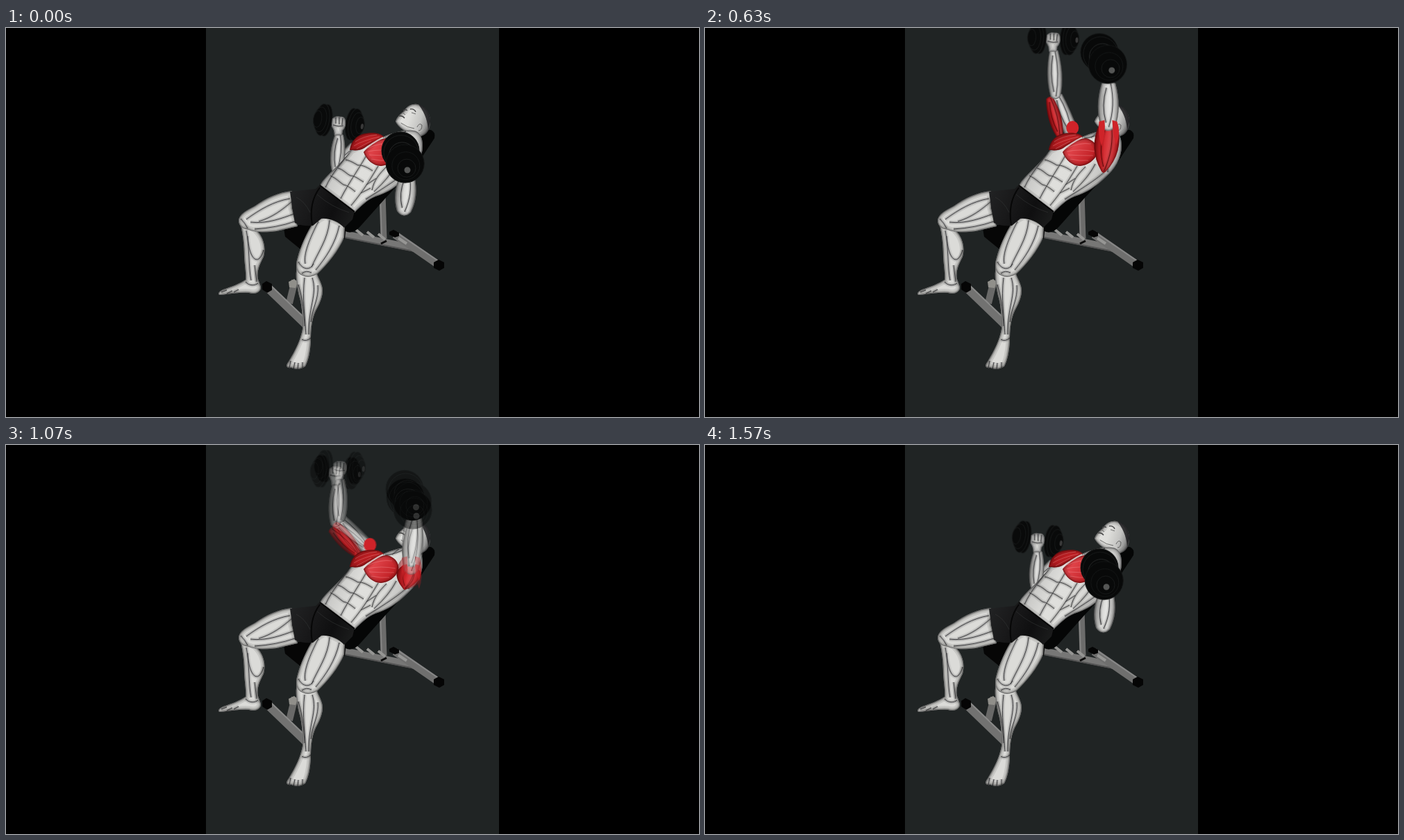
An HTML page with a canvas that plays this animation: 998x561 px, repeating every 1.61 s.

```html
<!DOCTYPE html>
<html lang="en">
<head>
<meta charset="utf-8">
<title>Incline dumbbell press</title>
<style>
html, body { margin: 0; width: 100%; height: 100%; overflow: hidden; background: #000; }
canvas { display: block; width: 100vw; height: 100vh; }
</style>
</head>
<body>
<canvas id="stage" width="998" height="561"></canvas>
<script>
const W = 998, H = 561, LOOP = 1610, STEP = 100 / 3;
const SKIN = '#dbdbd8', RED = '#cf2329';
const stage = document.getElementById('stage').getContext('2d');

function layer() {
  const c = document.createElement('canvas');
  c.width = W;
  c.height = H;
  return c.getContext('2d');
}

// ---- drawing helpers ----
function fill(g, d, color) {
  g.fillStyle = color;
  g.fill(new Path2D(d));
}

function line(g, d, color, width) {
  g.strokeStyle = color;
  g.lineWidth = width;
  g.stroke(d instanceof Path2D ? d : new Path2D(d));
}

// Filled form with darkened rim and engraved muscle lines
function form(g, d, color, lines, ink = '25,25,28') {
  const p = new Path2D(d);
  g.save();
  g.fillStyle = color;
  g.fill(p);
  g.clip(p);
  for (const [w, a] of [[11, .1], [6, .17], [2.4, .42]]) line(g, p, `rgba(${ink},${a})`, w);
  if (lines) {
    const q = new Path2D(lines);
    for (const [w, a] of [[6, .09], [3, .17], [1, .68]]) line(g, q, `rgba(${ink},${a})`, w);
  }
  g.restore();
}

function disc(g, x, y, rx, ry, color, rim) {
  g.beginPath();
  g.ellipse(x, y, rx, ry, 0, 0, 7);
  g.fillStyle = color;
  g.fill();
  if (rim) {
    g.strokeStyle = rim;
    g.lineWidth = 1;
    g.stroke();
  }
}

function ramp(g, x0, y0, x1, y1, ...colors) {
  const r = g.createLinearGradient(x0, y0, x1, y1);
  colors.forEach((c, i) => r.addColorStop(i / (colors.length - 1), c));
  return r;
}

// Tapered limb from a to b; w holds the half widths, shift moves it sideways
function limb(g, a, b, w, colors, shift = 0) {
  const dx = b[0] - a[0], dy = b[1] - a[1], len = Math.hypot(dx, dy);
  const [s, m, e] = w, bulge = 2 * m - (s + e) / 2;
  g.save();
  g.translate(a[0], a[1]);
  g.rotate(Math.atan2(dy, dx));
  g.translate(0, shift);
  const d = `M0,${-s}Q${len * .55},${-bulge} ${len},${-e}Q${len + e * 1.1},0 ${len},${e}` +
    `Q${len * .55},${bulge} 0,${s}Q${-s * .7},0 0,${-s}Z`;
  const cuts = `M0,${-s * .3}Q${len * .5},${-m * .7} ${len},${-e * .1}` +
    `M${len * .1},${s * .3}Q${len * .5},${m * .7} ${len * .9},${e * .3}`;
  form(g, d, ramp(g, 0, -m, 0, m, ...colors), cuts, colors.ink);
  g.restore();
}
const FLESH = ['#a9a9a7', '#ececea', '#d4d4d2', '#999997'];
const BLOOD = ['#b5171d', '#e0474c', '#cf2329', '#8f1015'];
BLOOD.ink = '70,0,4';

// ---- still layers ----
const back = layer(), body = layer();

function drawBack(g) {
  g.fillStyle = '#000';
  g.fillRect(0, 0, W, H);
  g.fillStyle = '#202424';
  g.fillRect(288, 0, 422, H);

  // rear frame
  line(g, 'M542,238L544,304', '#6c6c6b', 9);
  line(g, 'M539,240L541,300', '#838382', 2);
  line(g, 'M486,297L590,318', '#777776', 10);
  line(g, 'M488,302L588,322', '#555', 2);
  line(g, 'M560,298L622,341', '#6f6f6e', 11);
  line(g, 'M564,296L624,337', '#888', 2);
  line(g, 'M504,291l10,8M520,294l10,8M536,297l10,8M565,303l12,8', '#969694', 4);
  line(g, 'M540,311l8,-4', '#0a0a0a', 3);
  fill(g, 'M616,338l7,-4 8,4 0,8 -7,4 -8,-4ZM552,294l6,-3 8,4 0,5 -6,2 -8,-4Z', '#050505');
  // front frame
  line(g, 'M416,364L408,397', '#696968', 10);
  line(g, 'M377,375L432,428', '#727271', 12);
  line(g, 'M380,370L432,420', '#8a8a89', 2);
  fill(g, 'M407,366l8,-4 5,4 -3,9 -9,-1Z', '#908f8a');
  fill(g, 'M369,369l6,-4 8,4 0,9 -7,4 -7,-5Z', '#050505');
  // pads
  fill(g, 'M602,147L612,147Q619,150 617,159L594,194L545,247L512,284Q499,300 487,292L500,258L590,160Z', '#050606');
  fill(g, 'M400,289L440,280L490,286L488,304L470,306L434,318L424,319L402,301Z', '#060606');

  // head
  form(g, 'M561,135C563,128 568,124 573,120C577,113 584,109 592,110C603,112 611,122 611,134C611,147 606,153 598,156C590,158 584,152 578,150C571,147 565,142 561,135Z',
    ramp(g, 565, 125, 612, 140, '#e2e2df', '#dededb', '#c4c4c2', '#777'));
  fill(g, 'M594,110C605,113 611,123 611,135L608,147C607,136 605,125 594,110Z', 'rgba(25,25,27,.82)');
  line(g, 'M582,117q6,-1 8,4M572,119q4,-2 6,0M566,127q5,-1 8,3', '#454545', 1.4);
  line(g, 'M584,122l6,2M572,123l3,2M592,143q3,-7 7,-3q0,8 -5,8M569,137q9,7 19,8', 'rgba(40,40,40,.6)', 1);
}

function drawBody(g) {
  form(g, 'M497,176C490,186 480,196 470,206C460,216 454,222 452,228L502,266C512,256 520,248 532,243C550,238 566,226 576,216C590,204 600,188 600,170C600,158 596,150 588,148C575,146 560,150 543,157L515,168Z',
    ramp(g, 475, 200, 560, 240, '#c8c8c6', '#dfdfdc', '#dededb', '#c2c2c0'),
    'M522,178C512,198 494,222 482,246M489,190C496,191 503,196 507,198C513,197 522,202 528,206' +
    'M478,202C486,204 491,211 496,213C503,213 509,219 515,222M467,213C475,216 481,223 486,226C492,227 498,232 503,236' +
    'M493,180C484,195 470,208 460,230M536,199C527,214 517,232 497,256M548,200C538,210 530,219 527,234' +
    'M562,196C555,210 545,222 530,236M519,226L533,217M511,238L525,231M575,208C560,221 545,230 518,247' +
    'M546,159Q560,158 576,149M556,158L566,150M570,180Q582,190 580,208');

  // pectorals
  const pec = (d, colors, grain) => {
    form(g, d, ramp(g, 505, 155, 555, 192, ...colors), '', '60,0,0');
    line(g, grain, 'rgba(255,190,190,.28)', 1);
  };
  pec('M495,176C497,163 505,154 518,152C530,150 540,152 544,157C537,162 525,166 516,173C508,178 500,176 495,176Z',
    ['#a3161a', '#d0272b', '#8d1013'], 'M501,170Q514,162 538,157M503,164Q514,156 534,154M505,174Q516,168 526,163');
  pec('M515,179C522,167 535,160 548,159C560,161 567,171 565,181C561,191 551,198 540,199C529,199 519,190 515,179Z',
    ['#b81a1f', '#df4248', '#bf1e23'], 'M521,178Q540,174 561,178M523,183Q540,184 559,184M522,173Q538,165 556,167M526,189Q540,192 552,191');
  line(g, 'M543,158Q526,166 514,178', 'rgba(235,225,222,.8)', 2);

  // far leg
  form(g, 'M338,284C341,298 343,312 343,330C344,345 346,356 345,363C338,368 325,373 313,377C305,380 304,386 310,385C325,383 338,381 350,382C360,385 368,380 367,373L363,362C361,350 365,342 371,330C375,316 371,300 358,289Z',
    SKIN, 'M346,292C351,315 349,345 353,364M348,300C350,335 364,345 371,320M358,342L361,366M345,366C350,372 358,372 363,368M310,381l8,-3M318,383l8,-4M328,381l7,-4');
  form(g, 'M412,235C392,237 375,245 358,257C345,264 337,268 335,277C335,286 341,290 350,291C358,295 375,295 390,293L420,286L412,260Z',
    SKIN, 'M409,246C385,250 365,262 346,276M412,250C398,262 384,273 364,279M415,268C398,274 376,283 352,280M416,279Q390,288 358,290M338,275Q345,282 348,289');

  // near leg
  form(g, 'M419,345C416,356 419,372 422,386C427,402 427,420 427,434C424,451 416,466 407,481C402,487 404,491 411,490C418,493 426,492 431,488C436,479 438,466 439,452C439,435 440,421 446,408C454,394 458,382 455,372C452,362 446,354 445,344Z',
    SKIN, 'M430,360C426,390 431,420 432,442M441,360C449,385 435,402 436,442M421,370C428,394 429,410 430,430M449,371C451,390 441,404 439,424' +
    'M426,449Q432,453 439,447M410,480l-2,10M416,482l-2,10M421,483l-1,9M427,482l0,9');
  form(g, 'M443,280C433,295 424,315 420,331C416,343 418,354 427,357C435,361 443,358 449,354C463,341 479,321 487,302L488,284L460,270Z',
    SKIN, 'M450,279C437,304 428,326 431,340M466,277C464,305 448,325 440,345M480,285C474,312 460,332 446,349M421,337C427,349 438,350 443,340M426,354Q432,349 440,353');

  // shorts
  fill(g, 'M409,236L446,232L452,226L502,264L499,276L487,288C478,279 466,274 454,275L442,285C432,286 424,285 416,281Q412,260 409,236Z',
    ramp(g, 410, 240, 500, 280, '#212223', '#19191a', '#0f0f10', '#1c1d1d'));
  line(g, 'M452,227L502,265M452,230C440,246 438,266 441,284', '#070707', 2);
  line(g, 'M448,240Q468,258 494,266M418,244Q430,250 438,266', 'rgba(60,62,62,.45)', 1);
}

drawBack(back);
drawBody(body);

// ---- poses ----
// lift, far hand, far elbow, far shoulder, near hub, near wrist, near elbow
const POSES = [
  [0, 479, 139, 476, 206, 505, 174, 578, 205, 578, 212, 573, 265],
  [.2, 466, 120, 468, 187, 506, 172, 582, 190, 581, 200, 575, 257],
  [.43, 460, 81, 457, 156, 515, 154, 587, 160, 585, 172, 579, 231],
  [.785, 477, 39, 477, 112, 520, 150, 591, 97, 589, 108, 583, 177],
  [1, 505, 15, 509, 97, 526, 150, 585, 56, 580, 76, 580, 138]
];

function slope(i, k) {
  const a = POSES[Math.max(i - 1, 0)], b = POSES[Math.min(i + 1, POSES.length - 1)];
  return (b[k] - a[k]) / (b[0] - a[0]);
}

function pose(u) {
  let i = 0;
  while (i < POSES.length - 2 && u > POSES[i + 1][0]) i++;
  const a = POSES[i], b = POSES[i + 1], h = b[0] - a[0], s = (u - a[0]) / h, r = 1 - s;
  const at = k => a[k] * r * r * (1 + 2 * s) + b[k] * s * s * (3 - 2 * s) +
    h * s * r * (r * slope(i, k) - s * slope(i + 1, k));
  return [1, 3, 5, 7, 9, 11].map(k => [at(k), at(k + 1)]);
}

const clamp = x => Math.min(1, Math.max(0, x));
const ease = x => .5 - .5 * Math.cos(Math.PI * clamp(x));

function lift(t) {
  t = (t + LOOP) % LOOP;
  if (t < 840) return .97 * ease(t / 580) + .03 * ease((t - 580) / 260);
  return 1 - ease((t - 840) / 750);
}

// ---- moving parts ----
function sideBell(g, [x, y], u) {
  g.save();
  g.translate(x, y);
  g.rotate(.15 - .11 * u);
  g.fillStyle = '#777';
  g.fillRect(-16, -3, 32, 5);
  for (const s of [-1, 1]) {
    for (const [o, rx, ry] of [[19, 9, 23], [24, 10, 23], [27, 9, 18], [31, 6, 12]]) {
      disc(g, s * o, -3, rx, ry, '#090a0a', '#171919');
    }
  }
  disc(g, 34, -2, 2, 4, '#3a3a3a');
  g.restore();
}

function fist(g, [x, y]) {
  g.save();
  g.translate(x, y);
  form(g, 'M-9,-8Q-4,-13 2,-11Q9,-12 10,-5Q11,4 6,9L5,16L-6,16Q-6,8 -10,3Z', '#d6d6d3',
    'M-4,-10L-4,-1M1,-10L1,0M6,-9L5,1M-8,1Q0,4 7,2');
  g.restore();
}

function farArm(g, [hand, elbow, shoulder], u) {
  const heat = clamp((u - .04) / .2);
  limb(g, elbow, shoulder, [8, 10, 10], FLESH, -2);
  g.globalAlpha = heat;
  limb(g, elbow, [shoulder[0] - 6, shoulder[1] + 2], [5, 9, 5], BLOOD, 9);
  g.globalAlpha = heat * clamp((u - .2) / .3);
  disc(g, shoulder[0] + 4, shoulder[1] - 6, 9, 10, RED);
  g.globalAlpha = 1;
  sideBell(g, hand, u);
  limb(g, [hand[0] + 1, hand[1] + 15], elbow, [6, 10.5, 7], FLESH);
  fist(g, hand);
}

function endBell(g, [x, y], u) {
  const bx = -10 - 8 * u, by = -28 + 2 * u;
  const plate = (k, r, rim) => disc(g, x + bx * k, y + by * k, r, r, '#080909', rim);
  plate(1, 27, '#121414');
  plate(.9, 25, '#191b1b');
  plate(.75, 19, '#252727');
  plate(.6, 16, '#2a2c2c');
  plate(.33, 27.5, '#141616');
  plate(.22, 20, '#151717');
  plate(.1, 13, '#191b1b');
  disc(g, x, y, 4.5, 4.5, '#555655');
}

function nearArm(g, [, , , hub, wrist, elbow], u) {
  g.globalAlpha = clamp((u - .5) / .22);
  limb(g, [elbow[0] + 1, elbow[1] - 4], [574, 207], [13, 17, 3], BLOOD);
  g.globalAlpha = 1;
  limb(g, wrist, elbow, [10, 15, 10], FLESH);
  g.globalAlpha = clamp((u - .6) / .3);
  const [x, y] = elbow;
  fill(g, `M${x - 13},${y - 8}Q${x - 15},${y + 12} ${x - 9},${y + 28}Q${x - 3},${y + 8} ${x - 5},${y - 10}Z` +
    `M${x + 6},${y - 10}Q${x + 7},${y + 12} ${x + 12},${y + 26}Q${x + 19},${y + 8} ${x + 13},${y - 8}Z`, RED);
  g.globalAlpha = 1;
  endBell(g, hub, u);
}

function scene(g, u) {
  const p = pose(u);
  g.drawImage(back.canvas, 0, 0);
  g.save();
  g.beginPath();
  g.rect(288, 0, 422, H);
  g.clip();
  farArm(g, p, u);
  g.drawImage(body.canvas, 0, 0);
  nearArm(g, p, u);
  g.restore();
}

// Each step is an even mix of two neighbouring moments
const mix = layer();
let shown = -1;

function tick() {
  const n = Math.min(47, Math.floor((performance.now() % LOOP + 4) / STEP));
  if (n !== shown) {
    shown = n;
    scene(stage, lift(n * STEP - 20));
    scene(mix, lift(n * STEP + 20));
    stage.globalAlpha = .5;
    stage.drawImage(mix.canvas, 0, 0);
    stage.globalAlpha = 1;
  }
  requestAnimationFrame(tick);
}
tick();
</script>
</body>
</html>
```
